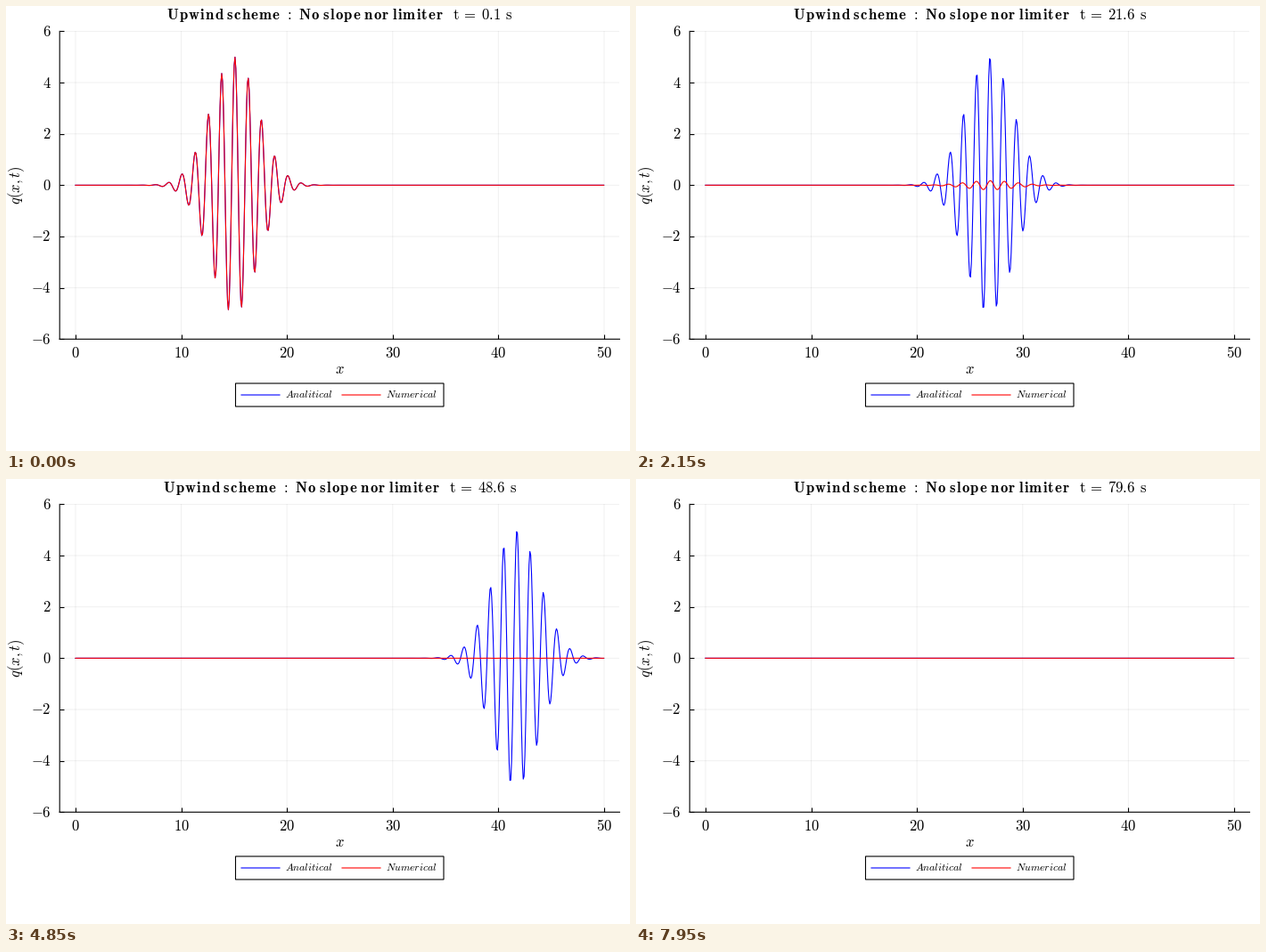
Write a matplotlib script that moves like this. It is 700 px wide and 500 px high and loops after 8000 ms.

```python
import numpy as np
import matplotlib.pyplot as plt
from matplotlib.animation import FuncAnimation
from matplotlib.patches import Rectangle

plt.rcParams["mathtext.fontset"] = "cm"
plt.rcParams["path.simplify"] = False
plt.rcParams["path.snap"] = False

W, H, DPI = 700, 500, 100
PX = 72 / DPI                      # one pixel in points
FRAMES, INTERVAL, STRIDE = 160, 50, 5

# Advection of a wave packet with first-order upwind differences
SPEED, DT, CFL = 0.55, 0.1, 0.7
DX = SPEED * DT / CFL
x = np.arange(0, 50, DX)


def packet(t):
    s = x - SPEED * t
    return 5 * np.exp(-(s - 15) ** 2 / 10) * np.cos(5 * s)


def exact(t):
    q = packet(t)
    q[0] = q[-1]
    return q


def upwind():
    q = packet(0)
    states = []
    for n in range(FRAMES * STRIDE):
        if n % STRIDE == 0:
            states.append(q)
        q = q - CFL * (q - np.roll(q, 1))
    return states


numeric = upwind()

fig = plt.figure(figsize=(W / DPI, H / DPI), dpi=DPI, facecolor="white")
left, right, top, bottom = 60.2, 688.4, 28.4, 374.3
ax = fig.add_axes([left / W, 1 - bottom / H, (right - left) / W, (bottom - top) / H])
pad = 0.03 * x[-1]
ax.set_xlim(-pad, x[-1] + pad)
ax.set_ylim(-6, 6)
ax.set_xticks(range(0, 51, 10), [])
ax.set_yticks(range(-6, 7, 2), [])
ax.tick_params(direction="in", length=5 * PX, width=1.1 * PX)
ax.grid(color="black", alpha=0.06, lw=PX)
ax.set_axisbelow(True)
for side in ("top", "right"):
    ax.spines[side].set_visible(False)
for side in ("left", "bottom"):
    ax.spines[side].set_linewidth(1.1 * PX)

blue, = ax.plot([], [], color="blue", lw=1.1 * PX)
red, = ax.plot([], [], color="red", lw=1.1 * PX)

# Overlay in pixel coordinates for all lettering and the legend
page = fig.add_axes([0, 0, 1, 1])
page.set_xlim(0, W)
page.set_ylim(H, 0)
page.axis("off")


def put(px, py, s, size=16.67, ha="left", va="baseline", **kw):
    return page.text(px, py, s, fontsize=size * PX, ha=ha, va=va, **kw)


for v in range(0, 51, 10):
    put(78 + 11.857 * v, 395, f"${v}$", ha="center")
for v in range(-6, 7, 2):
    put(50.5, 206.8 - 28.82 * v, f"${v}$", ha="right")
put(374, 412.7, "$x$", ha="center")
put(12, 201.5, "$q(x,t)$", ha="center", va="center", rotation=90)

page.add_patch(Rectangle((257.5, 424), 233.5, 26, fc="white", ec="black", lw=1.1 * PX))
for px, name, color in ((264, "Analitical", "blue"), (377, "Numerical", "red")):
    page.plot([px, px + 43], [437, 437], color=color, lw=1.1 * PX)
    put(px + 49, 440.4, f"${name}$", size=11.7)


def gap(em):
    return rf"\hspace{{{em / 0.878:.3f}}}"


def bold(phrase):
    words = [gap(0.073).join(w) for w in phrase.split()]
    return rf"\mathbf{{{gap(0.27).join(words)}}}"


HEADING = (bold("Upwind scheme") + gap(0.35) + ":" + gap(0.35)
           + bold("No slope nor limiter") + gap(0.72)
           + r"\mathrm{t}" + gap(0.16) + "=" + gap(0.22))
title = put(374.5, 15, "", ha="center")


def draw(i):
    blue.set_data(x, exact(i * STRIDE * DT))
    red.set_data(x, numeric[i])
    t = 0.1 + 0.5 * i
    title.set_text(f"${HEADING}{t:.1f}{gap(0.37)}" + r"\mathrm{s}$")
    return blue, red, title


anim = FuncAnimation(fig, draw, frames=FRAMES, interval=INTERVAL,
                     repeat=True, repeat_delay=0, blit=False)
plt.show()
```
